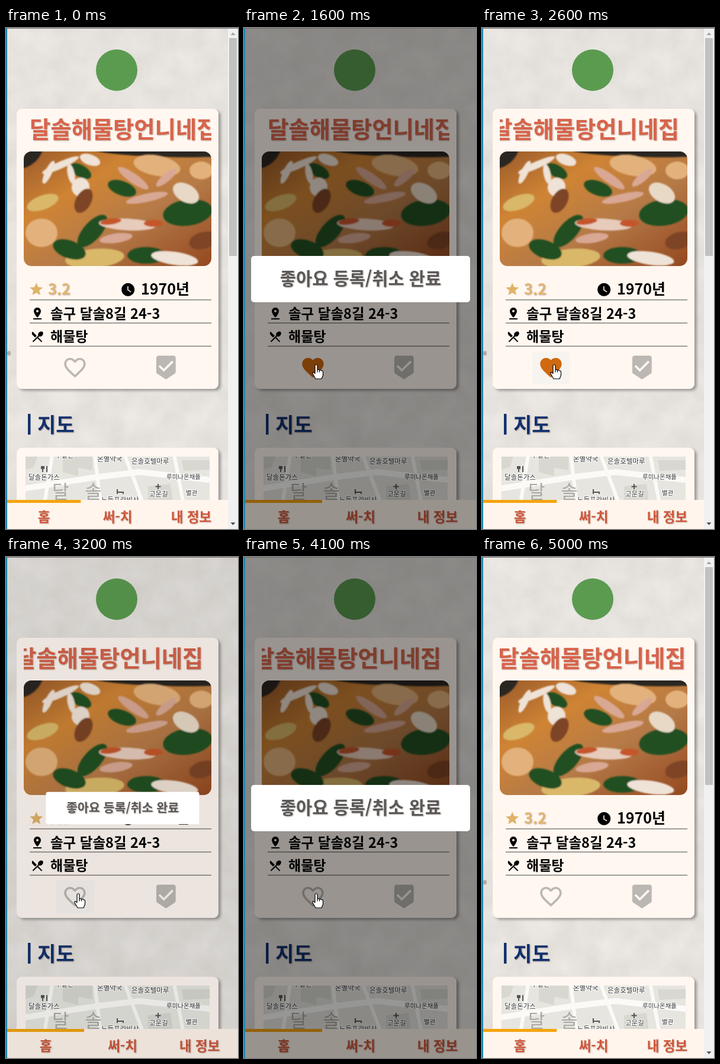
An HTML page for the animation above (5100 ms loop, 392 px wide and 844 px high).

```html
<!DOCTYPE html>
<html lang="ko">
<head>
<meta charset="utf-8">
<style>
html, body { margin: 0; width: 100%; height: 100%; overflow: hidden; background: #e6e2de; }
body { position: relative; }
svg { position: absolute; left: 0; top: 0; width: 100%; height: 100%; overflow: hidden; }
#paper { will-change: transform; }
text { font-family: "Noto Sans CJK KR", "Noto Sans CJK", sans-serif; font-weight: 700; }
.heavy, #tabs text { font-weight: 900; }
.soft { text-shadow: 1px 1px 2px rgba(90, 50, 30, .4); }
.rule { stroke: #85807b; stroke-width: 1.6; }
#labels text { font-size: 11.5px; font-weight: 500; fill: #333; stroke: #fff; stroke-width: 2; paint-order: stroke; }
#labels .small { font-size: 10.5px; }
#tabs text { font-size: 22.5px; fill: #d0573d; text-anchor: middle; }
</style>
</head>
<body>
<svg id="paper" viewBox="0 0 392 844">
  <filter id="grain" x="0" y="0" width="1" height="1" color-interpolation-filters="sRGB">
    <feTurbulence type="fractalNoise" baseFrequency=".025" numOctaves="4" seed="8"/>
    <feColorMatrix values=".07 0 0 0 .868  .07 0 0 0 .854  .07 0 0 0 .838  0 0 0 0 1"/>
  </filter>
  <rect width="392" height="844" filter="url(#grain)"/>
</svg>
<svg viewBox="0 0 392 844">
  <defs>
    <clipPath id="titleBox"><rect x="30" y="140" width="317" height="60"/></clipPath>
    <clipPath id="photoBox"><rect x="30" y="208" width="317" height="193" rx="13"/></clipPath>
    <clipPath id="mapBox"><rect x="33" y="722" width="311" height="80"/></clipPath>
    <filter id="blur"><feGaussianBlur stdDeviation="1.2"/></filter>
    <filter id="shade" x="-5%" y="-5%" width="112%" height="112%">
      <feDropShadow dx="4" dy="3" stdDeviation="2.2" flood-opacity=".32"/>
    </filter>
    <linearGradient id="broth" x2="1" y2="1">
      <stop stop-color="#9a5a2a"/><stop offset=".3" stop-color="#cf8434"/>
      <stop offset=".6" stop-color="#b57a48"/><stop offset="1" stop-color="#94481f"/>
    </linearGradient>
  </defs>

  <ellipse id="speck" cx="5" cy="548" rx="3" ry="4" fill="#b5a99e"/>
  <circle cx="187" cy="71" r="35" fill="#5b9b50"/>

  <g fill="#fff7f0" filter="url(#shade)">
    <rect x="18" y="136" width="341" height="472" rx="9"/>
    <rect x="18" y="707" width="341" height="160" rx="9"/>
  </g>
  <g clip-path="url(#titleBox)">
    <text id="title" class="soft heavy" y="185" font-size="38.3" fill="#d8644b">달솔해물탕언니네집</text>
  </g>
  <g clip-path="url(#photoBox)">
    <rect x="30" y="208" width="317" height="193" fill="url(#broth)"/>
    <g id="stew" filter="url(#blur)"></g>
  </g>

  <path fill="#e0b268" transform="translate(38 427) scale(1.1)" d="M12 17.27L18.18 21l-1.64-7.03L22 9.24l-7.19-.61L12 2 9.19 8.63 2 9.24l5.46 4.73L5.82 21z"/>
  <text class="soft" x="71" y="449" font-size="25" fill="#e2b672">3.2</text>
  <path transform="translate(193 427.5) scale(1.1)" d="M12 2C6.5 2 2 6.5 2 12s4.5 10 10 10 10-4.5 10-10S17.5 2 12 2zm4.2 14.2L11 13V7h1.5v5.2l4.5 2.7-.8 1.3z"/>
  <text x="228" y="449" font-size="25">1970년</text>
  <path transform="translate(41 469)" d="M18 8c0-3.31-2.69-6-6-6S6 4.69 6 8c0 4.5 6 11 6 11s6-6.5 6-11zm-8 0c0-1.1.9-2 2-2s2 .9 2 2-.89 2-2 2c-1.1 0-2-.9-2-2zM5 20v2h14v-2H5z"/>
  <text x="75" y="490" font-size="23.5">솔구 달솔8길 24-3</text>
  <path transform="translate(41 508)" d="M8.1 13.34l2.83-2.83L3.91 3.5c-1.56 1.56-1.56 4.09 0 5.66l4.19 4.18zm6.78-1.81c1.53.71 3.68.21 5.27-1.38 1.91-1.91 2.28-4.65.81-6.12-1.46-1.46-4.2-1.1-6.12.81-1.59 1.59-2.09 3.74-1.38 5.27L3.7 19.87l1.41 1.41L12 14.41l6.88 6.88 1.41-1.41L13.41 13l1.47-1.47z"/>
  <text x="75" y="528" font-size="23">해물탕</text>
  <path class="rule" d="M40 458H347M40 497H347M40 536H347"/>

  <rect id="hover" x="85" y="545" width="64" height="55" fill="#f7f4f0"/>
  <g transform="translate(94.6 550.2) scale(1.82)">
    <path id="liked" fill="#d0690f" d="M12 21.35l-1.45-1.32C5.4 15.36 2 12.28 2 8.5 2 5.42 4.42 3 7.5 3c1.74 0 3.41.81 4.5 2.09C13.09 3.81 14.76 3 16.5 3 19.58 3 22 5.42 22 8.5c0 3.78-3.4 6.86-8.55 11.54z"/>
    <path id="unliked" fill="#bbb7b2" d="M16.5 3c-1.74 0-3.41.81-4.5 2.09C10.91 3.81 9.24 3 7.5 3 4.42 3 2 5.42 2 8.5c0 3.78 3.4 6.86 8.55 11.54L12 21.35l1.45-1.32C18.6 15.36 22 12.28 22 8.5 22 5.42 19.58 3 16.5 3zm-4.4 15.55l-.1.1-.1-.1C7.14 14.24 4 11.39 4 8.5 4 6.5 5.5 5 7.5 5c1.54 0 3.04.99 3.57 2.36h1.87C13.46 5.99 14.96 5 16.5 5c2 0 3.5 1.5 3.5 3.5 0 2.89-3.14 5.74-7.9 10.05z"/>
  </g>
  <path fill="#bbb7b2" transform="translate(248.5 550.2) scale(1.82)" d="M19 1H5c-1.1 0-1.99.9-1.99 2L3 15.93c0 .69.35 1.3.88 1.66L12 23l8.11-5.41c.53-.36.88-.97.88-1.66L21 3c0-1.1-.9-2-2-2zm-9 15l-5-5 1.41-1.41L10 13.17l7.59-7.59L19 7l-9 9z"/>

  <rect x="37" y="650" width="4.5" height="35" fill="#12316e"/>
  <text class="soft heavy" x="53" y="681" font-size="34" fill="#12316e">지도</text>

  <g clip-path="url(#mapBox)">
    <rect x="33" y="722" width="311" height="80" fill="#e6e5df"/>
    <path fill="#d8d8d1" d="M33 722h20l-6 18-14 4zM96 722h50v23l-24-4v14l-26-7zM240 772l38-4 4 30h-42zM297 728h47v16l-44 2z"/>
    <g fill="none" stroke="#fbfaf7">
      <path stroke-width="10" d="M30 776L150 757L225 748L350 762"/>
      <path stroke-width="6" d="M78 720L65 802M150 720L160 802M200 718L232 802M284 718L300 802"/>
    </g>
    <text x="78" y="792" font-size="31" style="font-weight:300" letter-spacing="9" fill="#aaa9a5">달 솔</text>
    <g id="labels">
      <text x="83" y="724">두일관</text><text x="154" y="730">온별약국</text>
      <text x="212" y="734">은솔호텔마루</text><text x="38" y="761">달솔돈가스</text>
      <text class="small" x="271" y="760">루미나온채플</text><text class="small" x="304" y="787">별관</text>
      <text x="242" y="789">고운길</text><text x="161" y="799">노들프라비사</text>
    </g>
    <path fill="none" stroke="#555" stroke-width="2" d="M62 738v10M60 738v4h4v-4M69 738v10M257 768v9M252.5 772.5h9M188 777v8M188 782h10v3"/>
  </g>

  <g id="tabs">
    <rect id="bar" x="2" y="795" height="49" fill="#fff5ec"/>
    <rect id="active" x="2" y="795" height="5" fill="#f4a40f"/>
    <text class="soft" y="832">홈</text><text class="soft" y="832">써-치</text><text class="soft" y="832">내 정보</text>
  </g>
  <g id="scrollbar">
    <rect x="375" width="17" height="844" fill="#f1f1f1"/>
    <rect x="377" y="17" width="13" height="367" fill="#c1c1c1"/>
    <path fill="#a3a3a3" d="M379.5 12h8l-4-4.500z"/><path fill="#505050" d="M379.5 833h8l-4 4.500z"/>
  </g>

  <rect id="backdrop" width="392" height="844"/>
  <g id="popup">
    <rect x="-185" y="-39" width="370" height="78" rx="5" fill="#fff"/>
    <text class="soft" y="10" font-size="29.5" text-anchor="middle" fill="#595959">좋아요 등록/취소 완료</text>
  </g>
  <path fill="#1a86b4" d="M0 0h2v844H0z"/><path fill="#6b6968" d="M0 0h392v1H0z"/>
  <path id="cursor" fill="#fff" stroke="#000" stroke-width="1.2" stroke-linejoin="round"/>
</svg>
<script>
const $ = id => document.getElementById(id);
const LOOP = 5100, FADE = 100, SHOW = 300, HIDE = 150;
const DIALOGS = [{ open: 1225, close: 2080 }, { open: 3182, close: 4190 }];
const HAND = 'M-2 1.5Q0-1.5 2 1.5V9q2-1.500 3.500.5 2-1 3.500 1 2.500-.5 2.500 2.500V18l-2.500 6H-1L-6 15.500q-.5-2.500 1.500-2.500L-2 15zM2 9v4M5.500 9.500v3.500';
const ARROW = 'M0 0V17l4-4 3 6.500 2.500-1L6.700 12H12z';

// colour: cx cy rx ry angle; ...
const STEW = {
  '#292522': '34 212 32 20 -38; 260 209 110 8 2',
  '#e3b27c': '60 345 27 24 0; 255 232 40 17 10; 330 240 20 15 0',
  '#d9b869': '150 388 50 16 -5; 62 294 28 12 -20',
  '#234f20': '146 342 34 15 -48; 107 373 29 15 20; 196 270 25 12 20; 307 311 42 22 -8; 237 383 32 14 0; 126 241 20 10 30',
  '#efe2d6': '92 231 34 6 -24; 72 243 6 21 25; 110 246 6 17 -12; 126 268 15 16 10; 142 222 18 9 20; 285 388 40 11 8',
  '#d9a894': '215 253 31 8 35; 238 286 36 7 -12; 186 354 28 8 -8; 271 252 22 7 -40',
  '#e8d9c6': '304 278 24 15 30',
  '#7d4526': '131 291 13 22 28; 333 358 24 14 -15',
  '#e7cbbb': '205 331 48 10 3',
  '#c5562b': '177 326 18 5 -8; 249 329 16 6 0'
};
$('stew').innerHTML = Object.entries(STEW).map(([fill, list]) => list.split('; ').map(item => {
  const [x, y, rx, ry, a] = item.split(' ');
  return `<ellipse cx="${x}" cy="${y}" rx="${rx}" ry="${ry}" fill="${fill}" transform="rotate(${a} ${x} ${y})"/>`;
}).join('')).join('');

const ramp = (t, start, length) => Math.min(1, Math.max(0, (t - start) / length));
const smooth = p => p * p * (3 - 2 * p);

// Interpolates [time, value] stops.
function track(t, stops) {
  let [, value] = stops[0];
  for (let i = 1; i < stops.length; i++) {
    const [from, start] = stops[i - 1], [to, end] = stops[i];
    value += (end - start) * smooth(ramp(t, from, to - from));
  }
  return value;
}
const visible = (id, on) => $(id).setAttribute('visibility', on ? 'visible' : 'hidden');
const place = (id, x, y, scale = 1) => $(id).setAttribute('transform', `translate(${x} ${y}) scale(${scale})`);

function layoutTabs(width) {
  const tab = width / 3;
  $('bar').setAttribute('width', width);
  $('active').setAttribute('width', tab);
  document.querySelectorAll('#tabs text').forEach((label, i) => label.setAttribute('x', 2 + tab * (i + .5)));
}

function draw(t) {
  place('title', 40 - 24 * ramp(t, 1600, 1000) + 24 * ramp(t, 4530, 1000), 0);

  const dialog = DIALOGS.find(d => t >= d.open - 30 && t < d.close + HIDE);
  visible('scrollbar', !dialog);
  visible('speck', !dialog);
  layoutTabs(dialog ? 390 : 373);
  visible('popup', dialog && t >= dialog.open + 18);
  let dim = 0;
  if (dialog) {
    const hide = ramp(t, dialog.close, HIDE);
    const show = ramp(t, dialog.open + 18, SHOW);
    const scale = track(show, [[0, .7], [.45, 1.05], [.8, .95], [1, 1]]) - hide / 2;
    place('popup', 197, 423, scale);
    $('popup').setAttribute('opacity', 1 - hide);
    dim = .4 * (ramp(t, dialog.open, FADE) - ramp(t, dialog.close, FADE));
  }
  $('backdrop').setAttribute('opacity', dim);

  const liked = t >= DIALOGS[0].open - 30 && t < DIALOGS[1].open - 30;
  visible('liked', liked);
  visible('unliked', !liked);

  const x = track(t, [[100, 310], [600, 122], [4330, 122], [4480, 226], [4600, 226], [4720, 240]]);
  const y = track(t, [[100, 862], [600, 567], [4330, 567], [4480, 813], [4600, 813], [4720, 870]]);
  const onHeart = x > 85 && x < 149 && y > 545 && y < 600;
  $('cursor').setAttribute('d', onHeart || y > 795 ? HAND : ARROW);
  place('cursor', x, y);
  visible('hover', onHeart && !(dialog && t > dialog.open + 40));
}

function tick() {
  draw(performance.now() % LOOP);
  requestAnimationFrame(tick);
}
tick();
</script>
</body>
</html>
```
